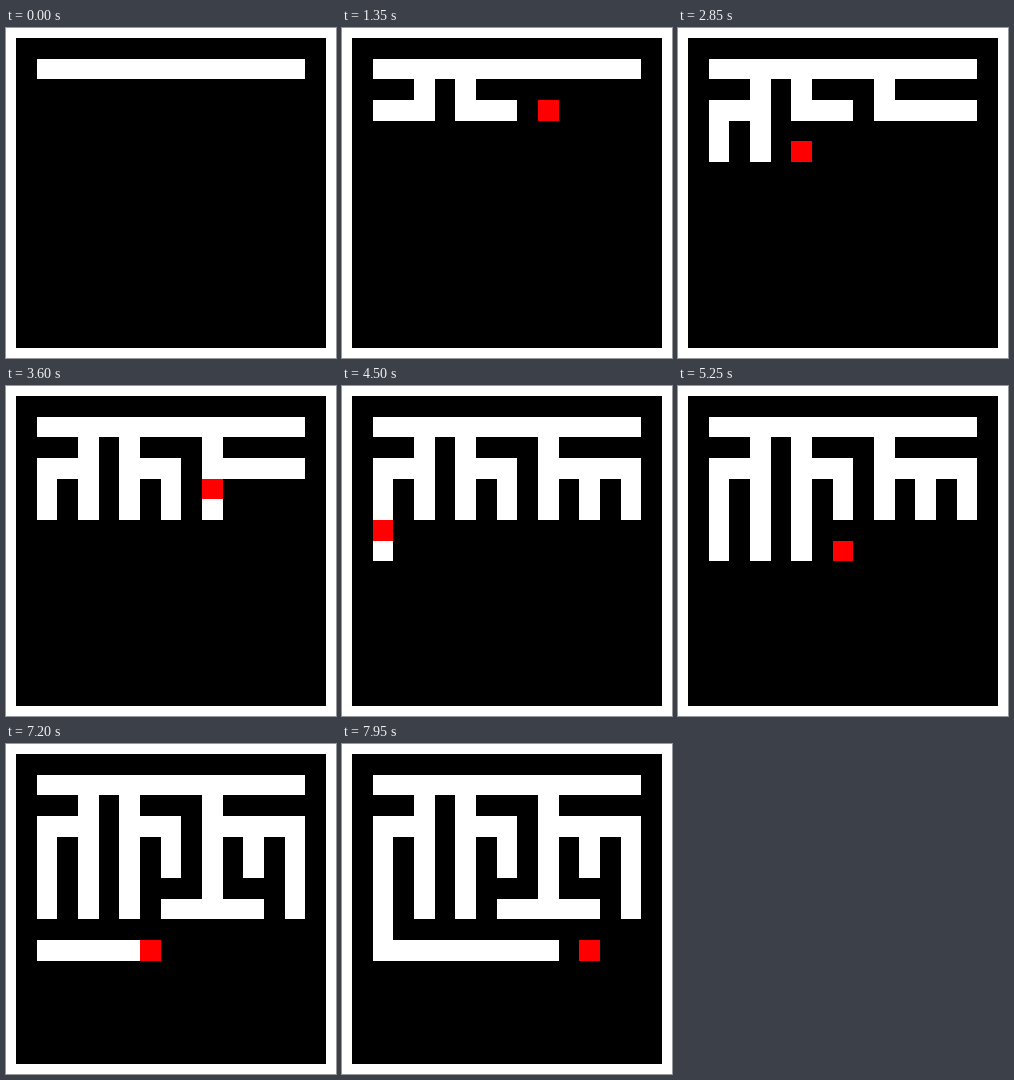
Animation, 330 px wide and 330 px high, one loop 8000 ms. Source, as an HTML page with a canvas:

```html
<!DOCTYPE html>
<html lang="en">
<head>
<meta charset="utf-8">
<title>Sidewinder maze</title>
<style>
html, body { margin: 0; width: 100%; height: 100%; overflow: hidden; background: #fff; }
canvas { display: block; width: 330px; height: 330px; }
</style>
</head>
<body>
<canvas id="stage" width="330" height="330"></canvas>
<script>
const LOOP = 8000, STEP = 150;
const MARGIN = 10, SIZE = 310, GRID = 15, COLS = 7;
const ctx = document.getElementById("stage").getContext("2d");

// Each row below the top corridor: runs of [length, offset of the door north].
const rows = [
  [[2, 1], [2, 0], [3, 0]],
  Array(COLS).fill([1, 0]),
  [[1, 0], [1, 0], [1, 0], [3, 1], [1, 0]],
  [[5, 0], [1, 0]]
];

// One carved grid square per step: a cell, then its link east or the run's door.
const path = [];
rows.forEach((runs, r) => {
  const y = 2 * r + 3;
  let col = 0;
  for (const [length, door] of runs) {
    for (let k = 0; k < length; k++) {
      const x = 2 * (col + k) + 1;
      path.push([x, y]);
      path.push(k < length - 1 ? [x + 1, y] : [2 * (col + door) + 1, y - 1]);
    }
    col += length;
  }
});

const edge = i => Math.round(MARGIN + i * SIZE / GRID);

function fill(color, x, y, w = 1, h = 1) {
  ctx.fillStyle = color;
  ctx.fillRect(edge(x), edge(y), edge(x + w) - edge(x), edge(y + h) - edge(y));
}

function draw(step) {
  ctx.fillStyle = "#fff";
  ctx.fillRect(0, 0, 330, 330);
  fill("#000", 0, 0, GRID, GRID);
  fill("#fff", 1, 1, 2 * COLS - 1);
  for (let i = 0; i < step; i++) {
    fill(i === step - 1 ? "#f00" : "#fff", ...path[i]);
  }
}

const start = performance.now();
function tick() {
  const t = (performance.now() - start) % LOOP;
  draw(Math.floor(t / STEP));
  requestAnimationFrame(tick);
}
tick();
</script>
</body>
</html>
```
